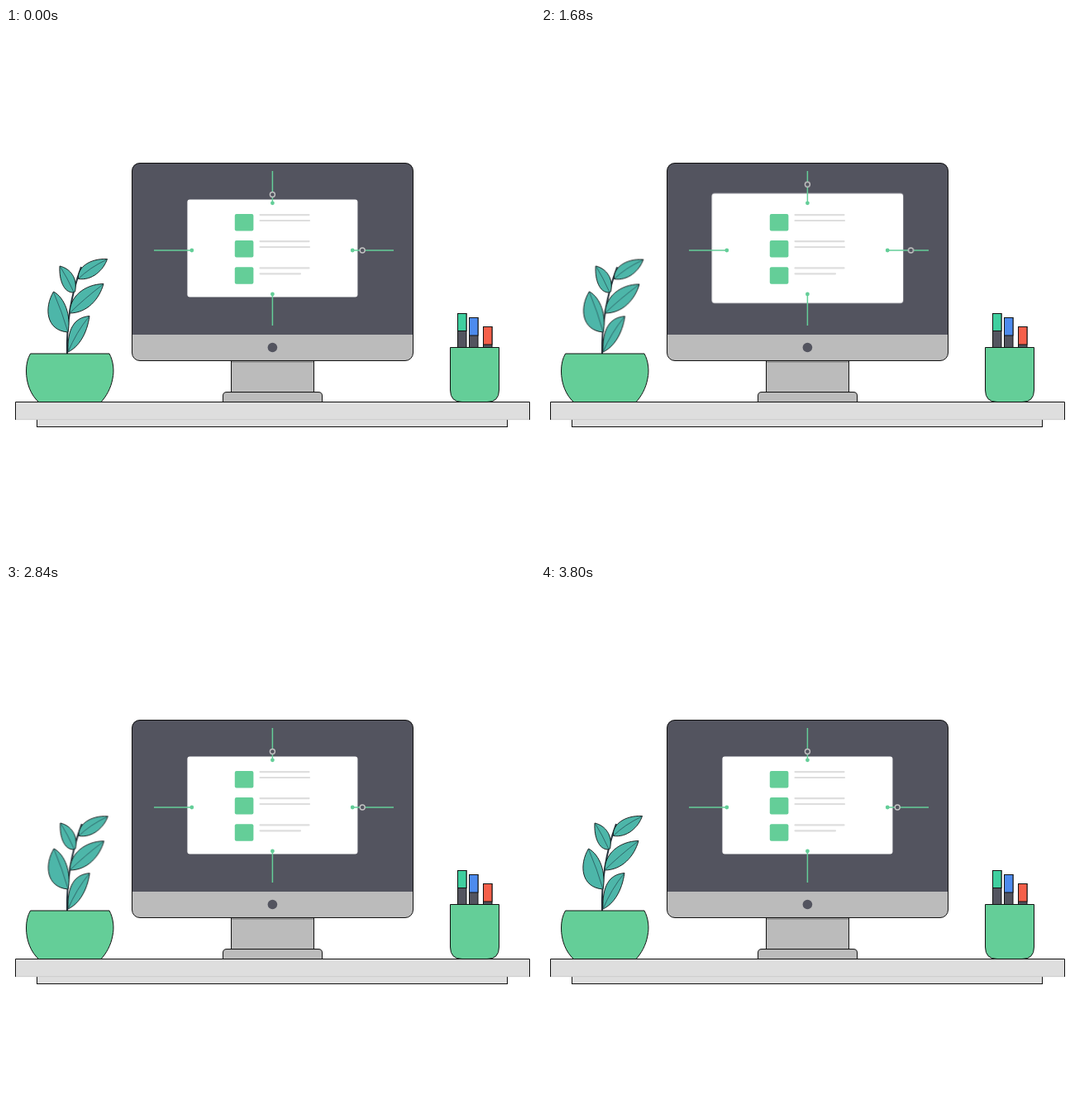
An HTML page for the animation above (3.84 s loop, 640x640 px).

```html
<!DOCTYPE html>
<html lang="en">
<head>
<meta charset="utf-8">
<title>Desk</title>
<style>
html, body { margin: 0; width: 100%; height: 100%; overflow: hidden; background: #fff; }
svg { display: block; width: 100vw; height: 100vh; }
.ink { stroke: #111; stroke-width: 1; }
.green { fill: #64ce98; }
.dark { fill: #53545f; }
.grey { fill: #bbb; }
.desk { fill: #dedede; }
.leaf { fill: #4db6a9; stroke: #111; stroke-width: .9; }
.vein { fill: none; stroke: #2b5f63; stroke-width: .9; }
.guide { stroke: #64ce98; stroke-width: 1.5; }
.text { stroke: #dedede; stroke-width: 2.2; stroke-linecap: round; }
.knob { fill: #53545f; stroke: #c4c4c4; stroke-width: 1.4; }
#panel { transform-origin: 322.4px 266.5px; }
#plant { transform-origin: 74px 394px; }
</style>
</head>
<body>
<svg viewBox="0 0 640 640">
  <!-- desk -->
  <rect class="desk ink" x="37.5" y="473.5" width="569" height="9"/>
  <rect class="desk" x="11.5" y="452.5" width="622" height="21.5"/>
  <path d="M12 473.7H633" stroke="#c4c4c4" stroke-width=".7"/>
  <path class="ink" fill="none" d="M11.5 474V452.5H633.5V474"/>

  <!-- plant -->
  <g id="plant">
    <path d="M74 394C73 360 79 322 91 289" fill="none" stroke="#25303a" stroke-width="2"/>
    <path class="leaf" d="M87.5 303.5C86 290 101 278.5 122.5 279.5C118 293 104 306 87.5 303.5Z"/>
    <path class="leaf" d="M81 320C70 320 64 305 65 288C78 291 87 303 83.5 319Z"/>
    <path class="leaf" d="M77 345C77 325 95 310 118 309.5C113 328 98 345 77 345Z"/>
    <path class="leaf" d="M75 368C48 366 46 338 57.5 319C71 326 79 348 75 368Z"/>
    <path class="leaf" d="M75 392C74 365 82 350 101 348.5C98 370 88 386 75 392Z"/>
    <path class="vein" d="M87.5 303.5Q101 290 122 280M82 319.5Q74 302 65.500 288.500M77 345Q94 328 117.500 310M75 368Q68 344 57.500 319.500M75 392Q85 368 100.500 349"/>
  </g>
  <path class="green ink" d="M29.500 394H125C130 403 131 415 129 424C127 436 121 446 115 452.500H39.500C30 444 24.500 430 24.500 415C24.500 407 26 400 29.500 394Z"/>

  <!-- pens and cup -->
  <g id="pens"></g>
  <path class="green ink" d="M537.5 386.5H596.5V438Q596.5 452.5 582 452.5H552Q537.5 452.5 537.5 438Z"/>

  <!-- monitor -->
  <rect class="grey ink" x="272.500" y="402.500" width="100" height="38.500"/>
  <rect x="273" y="403" width="99" height="2" fill="#969696"/>
  <path class="grey ink" d="M262.500 452.500V445Q262.500 440.500 267 440.500H378Q382.500 440.500 382.500 445V452.500Z"/>
  <rect class="grey" x="152.500" y="163.500" width="340" height="239" rx="9.500"/>
  <path class="dark" d="M152.500 371V173Q152.500 163.500 162 163.500H483Q492.500 163.500 492.500 173V371Z"/>
  <rect class="ink" fill="none" x="152.500" y="163.500" width="340" height="239" rx="9.500"/>
  <circle class="dark" cx="322.400" cy="386.500" r="5.800"/>

  <!-- screen -->
  <rect id="panel" x="219.400" y="207.500" width="206" height="118" rx="3" fill="#fff"/>
  <g id="list"></g>
  <g id="guides"></g>
  <circle id="knobY" class="knob" cx="322.400" cy="201.500" r="3"/>
  <circle id="knobX" class="knob" cx="431.200" cy="269" r="3"/>
</svg>
<script>
const $ = id => document.getElementById(id);

function add(parent, tag, attrs) {
  const el = document.createElementNS('http://www.w3.org/2000/svg', tag);
  for (const k in attrs) el.setAttribute(k, attrs[k]);
  $(parent).append(el);
}

const line = (parent, cls, x1, y1, x2, y2) =>
  add(parent, 'line', { class: cls, x1, y1, x2, y2 });

// x, top, end of the coloured part, colour
[[546.5, 345.5, 366.5, '#3fcf9f'],
 [560.5, 350.5, 372, '#4d8bee'],
 [577.5, 361.5, 383, '#f5604a']].forEach(([x, y, end, fill]) => {
  add('pens', 'rect', { class: 'dark ink', x, y, width: 10.5, height: 388 - y });
  add('pens', 'rect', { class: 'ink', x, y, width: 10.5, height: end - y, fill });
});

// top of each row, end of its second line
[[225, 367], [257, 367], [289.3, 356]].forEach(([y, end]) => {
  add('list', 'rect', { class: 'green', x: 276.8, y, width: 22.6, height: 20.5, rx: 2 });
  line('list', 'text', 307.5, y + 1.1, 366.5, y + 1.1);
  line('list', 'text', 307.5, y + 8, end, y + 8);
});

// outer end, then the end with the dot
[[322.4, 173, 322.4, 211.8],
 [322.4, 360, 322.4, 322],
 [179, 269, 224.8, 269],
 [469, 269, 419.2, 269]].forEach(([x1, y1, x2, y2]) => {
  line('guides', 'guide', x1, y1, x2, y2);
  add('guides', 'circle', { class: 'green', cx: x2, cy: y2, r: 2.4 });
});

const LOOP = 3840;
const SMOOTH = 'cubic-bezier(.333,0,.667,1)';

function play(id, steps, easing) {
  $(id).animate(
    steps.map(([t, transform]) => ({ offset: t / LOOP, transform, easing })),
    { duration: LOOP, iterations: Infinity });
}

// out from the start, back around 1680 ms
function outAndBack(id, rest, moved, span) {
  play(id, [[0, rest], [span, moved], [1680 - span / 2, moved],
            [1680 + span / 2, rest], [LOOP, rest]], SMOOTH);
}

outAndBack('panel', 'scale(1)', 'scale(1.25)', 560);
outAndBack('knobX', 'translate(0px,0px)', 'translate(32.8px,0px)', 480);
outAndBack('knobY', 'translate(0px,0px)', 'translate(0px,-24.7px)', 480);
play('plant', [[0, 'rotate(0deg)'], [LOOP / 2, 'rotate(.7deg)'], [LOOP, 'rotate(0deg)']], SMOOTH);
</script>
</body>
</html>
```
